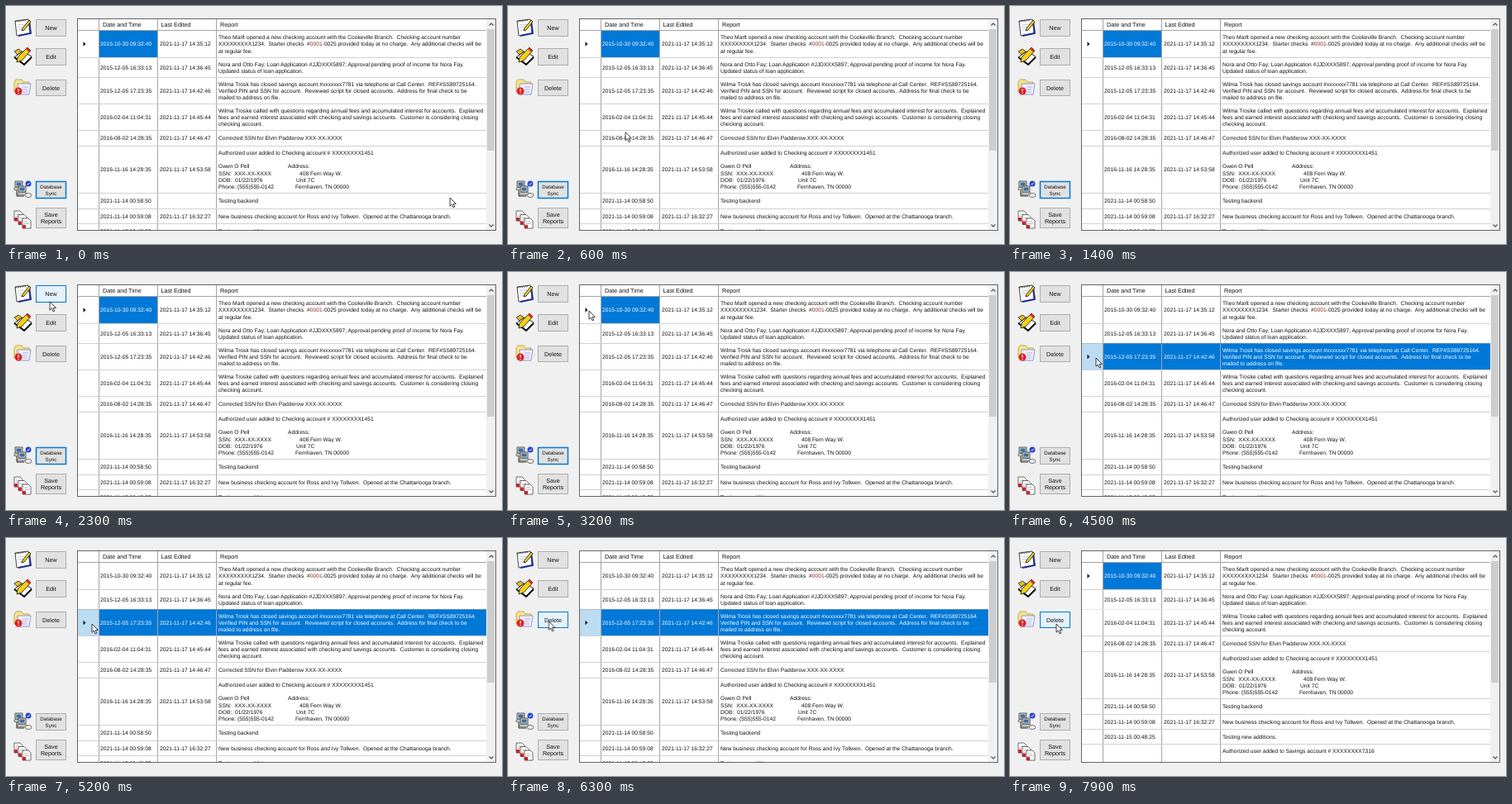
Recreate the animation shown at these times as an HTML page. Size 600 px wide and 288 px high, loop 8 s.

```html
<!DOCTYPE html>
<html lang="en">
<head>
<meta charset="utf-8">
<title>Account reports</title>
<style>
  html, body { margin: 0; width: 100%; height: 100%; overflow: hidden; background: #f0f0f0; }
  svg { display: block; width: 600px; height: 288px; }
  text {
    font: 6.7px "Liberation Sans", Arial, sans-serif;
    fill: var(--fg, #111); white-space: pre; text-rendering: geometricPrecision;
  }
  .head { font-size: 7.2px; }
  .label { font-size: 7.2px; text-anchor: middle; }
  .label.small { font-size: 6.2px; }
  .red { fill: var(--red, #8c2a1c); }
  .bg { fill: var(--bg, #fff); }
  .side { fill: var(--side, #fff); }
  .mark { fill: var(--mark, transparent); }
  .grid { stroke: #a4a4a4; fill: none; shape-rendering: crispEdges; }
  .face { fill: var(--face, #e1e1e1); stroke: var(--edge, #adadad); stroke-width: var(--line, 1px); }

  .first, .rest, .second, .third, .tail, .btn, #cursor { animation: 8s step-end infinite; }
  .first { animation-name: first; }
  .rest { animation-name: rest; }
  .second { animation-name: second; }
  .third { animation-name: third; }
  .tail { animation-name: tail; }
  .new { animation-name: new; }
  .edit { animation-name: edit; }
  .delete { animation-name: delete; }
  .sync { animation-name: sync; }
  #cursor { animation-name: move; animation-timing-function: ease-in-out; }

  @keyframes first {
    0%, 85%, 100% { --bg: #0078d7; --fg: #fff; --mark: #111; }
    55% { --bg: #fff; --fg: #111; --mark: transparent; }
  }
  @keyframes rest {
    0%, 55%, 100% { --bg: #fff; --side: #fff; --fg: #111; --red: #8c2a1c; }
    42.5% { --bg: #0078d7; --side: #bcdcf4; --fg: #fff; --red: #fff; }
  }
  @keyframes second {
    0%, 51%, 100% { --side: #fff; }
    46.5% { --side: #d9ebf9; }
  }
  @keyframes third {
    0%, 85%, 100% { --bg: #fff; --side: #fff; --fg: #111; --mark: transparent; }
    55% { --bg: #0078d7; --side: #bcdcf4; --fg: #fff; --mark: #111; }
  }
  @keyframes tail {
    0% { transform: none; }
    85%, 100% { transform: translateY(-32px); }
  }
  @keyframes new {
    0%, 31.5%, 100% { --face: #e1e1e1; --edge: #adadad; }
    26.1% { --face: #e5f1fb; --edge: #0078d7; }
  }
  @keyframes edit {
    0%, 37.5%, 100% { --face: #e1e1e1; --edge: #adadad; }
    33.3% { --face: #e5f1fb; --edge: #0078d7; }
  }
  @keyframes sync {
    0% { --edge: #0078d7; --line: 1.5px; }
    42.5%, 100% { --edge: #adadad; --line: 1px; }
  }
  @keyframes delete {
    0% { --face: #e1e1e1; --edge: #adadad; }
    73.9%, 82.5%, 100% { --face: #e5f1fb; --edge: #0078d7; }
    81.25% { --face: #cce4f7; --edge: #005499; }
  }
  @keyframes move {
    0%, 1.25% { transform: translate(537px, 232px); }
    11.25% { transform: translate(-20px, 120px); }
    23.75% { transform: translate(-20px, 60px); }
    27.5%, 30% { transform: translate(53px, 36px); }
    35% { transform: translate(58px, 58px); }
    40%, 43.75% { transform: translate(98px, 47px); }
    48.75% { transform: translate(100px, 73px); }
    53.75%, 68.75% { transform: translate(104px, 104px); }
    77.5%, 83.75% { transform: translate(49.5px, 101px); }
    93.75%, 98.74% { transform: translate(63px, 100px); }
    98.75%, 100% { transform: translate(56px, 104px); }
  }
</style>
</head>
<body>
<svg viewBox="0 0 600 288">
  <defs>
    <clipPath id="body"><rect x="87" y="29" width="494" height="242"/></clipPath>
    <g id="sheet">
      <path d="M0 0h7l3 3v9h-10z" fill="#fff" stroke="#444" stroke-width=".8"/>
      <path d="M2 4h5M2 6.500h6" stroke="#999" stroke-width=".7"/>
      <path d="M0 8h4v4h-4z" fill="#c8202c"/>
    </g>
    <g id="pc">
      <path d="M0 0h9v7h-9z" fill="#d8d8d0" stroke="#333" stroke-width=".8"/>
      <path d="M1.500 1.500h6v4h-6z" fill="#3a6ea5"/>
      <path d="M-1 8h11v2.500h-11z" fill="#e8e8e0" stroke="#444" stroke-width=".7"/>
    </g>
  </defs>

  <!-- notepad -->
  <g stroke-width=".9">
    <path d="M11 18l16-2 2 17-16 3z" fill="#fff" stroke="#333"/>
    <path d="M28 17l2 16-15 3" fill="none" stroke="#1a2a9c" stroke-width="1.800"/>
    <path d="M11 19l13-2" stroke="#333" stroke-width="1.600" stroke-dasharray="1 1"/>
    <path d="M14 23l9-1M14 26l8-1M15 29l5-.5" stroke="#bcc4d0"/>
    <path d="M28 17l2 2-8 10-3 1 1-3z" fill="#f2d51c" stroke="#222"/>
  </g>
  <!-- pencil and pad -->
  <g stroke-width=".9">
    <path d="M10 62l10-7 11 6-9 9z" fill="#fff" stroke="#111"/>
    <path d="M10 62l12 9 9-9" fill="none" stroke="#111" stroke-width="2"/>
    <path d="M26 50l4 4-11 12-6 2 1-6z" fill="#f4cf16" stroke="#222"/>
    <path d="M26 50l4 4-2 2-4-4z" fill="#d03030"/>
    <path d="M10 55l5-3 4 3-5 4z" fill="#e6bd1e" stroke="#333"/>
  </g>
  <!-- folder -->
  <g stroke-width=".8">
    <path d="M10 92l2-3h7l2 3h7v12h-18z" fill="#f8e58a" stroke="#b09a3a"/>
    <path d="M14 94h16l-2 13h-14z" fill="#eef0ff" stroke="#7c80c8"/>
    <path d="M20 98h7M20 101h6M20 104h6" stroke="#9aa0d8"/>
    <circle cx="15" cy="103" r="4.500" fill="#e02020"/>
    <path d="M15 100.300v3.200M15 105v1" stroke="#fff" stroke-width="1.300"/>
  </g>
  <!-- linked computers -->
  <g>
    <use href="#pc" x="11" y="212"/>
    <use href="#pc" x="15" y="218"/>
    <path d="M13 223v7h9" fill="none" stroke="#222"/>
    <circle cx="27" cy="215" r="3.500" fill="#2447c8"/>
    <path d="M25.500 215l1.200 1.300 2-2.600" fill="none" stroke="#fff" stroke-width=".9"/>
    <ellipse cx="27" cy="229" rx="4" ry="2.500" fill="#eee" stroke="#444" stroke-width=".7"/>
  </g>
  <!-- report sheets -->
  <use href="#sheet" x="10" y="248"/>
  <use href="#sheet" x="15" y="252.500"/>
  <use href="#sheet" x="20" y="257"/>

  <g id="buttons"></g>
  <path d="M87 16h505v255h-505z" fill="#fff"/>
  <g clip-path="url(#body)" id="rows"></g>
  <g id="header"></g>

  <!-- scroll bar -->
  <path d="M581 16h11v255h-11z" fill="#f0f0f0"/>
  <path d="M582 28h9v147h-9z" fill="#cdcdcd"/>
  <path d="M584.500 23.500l2.500-2.500 2.500 2.500M584.500 264.500l2.500 2.500 2.500-2.500" fill="none" stroke="#505050" stroke-width="1.200"/>
  <path class="grid" d="M86.500 15.500h506v256h-506z" style="stroke:#646464"/>

  <path id="cursor" d="M0 0v10.200l2.400-2.200 1.700 3.900 1.700-.8-1.700-3.700h3.300z" fill="#fff" stroke="#111" stroke-width=".8"/>
</svg>

<script>
  const put = (id, html) => document.getElementById(id).innerHTML = html;
  const text = (x, y, s, cls = "") => `<text x="${x}" y="${y}" class="${cls}">${s}</text>`;
  const box = (x, y, w, h, cls) => `<rect x="${x}" y="${y}" width="${w}" height="${h}" class="${cls}"/>`;

  const buttons = [
    ["new", 16, 21, "New"],
    ["edit", 51, 21, "Edit"],
    ["delete", 89, 20, "Delete"],
    ["sync", 212, 21, "Database", "Sync"],
    ["save", 244, 25, "Save", "Reports"],
  ];
  put("buttons", buttons.map(([name, y, h, ...lines]) => {
    const size = name === "sync" ? "label small" : "label";
    const base = y + h / 2 + 2.6 - (lines.length - 1) * 4;
    return `<g class="btn ${name}">` + box(36.5, y + .5, 36, h - 1, "face") +
      lines.map((s, i) => text(54.5, base + i * 8, s, size)).join("") + "</g>";
  }).join(""));

  // Each row: height, created, edited, report lines; a line may hold [left, x, right].
  const rows = [
    [33, "2015-10-30 09:32:40", "2021-11-17 14:35:12", [
      "Theo Marlt opened a new checking account with the Cookeville Branch.  Checking account number",
      'XXXXXXXXX1234.  Starter checks  #<tspan class="red">0001</tspan>-0025 provided today at no charge.  Any additional checks will be',
      "at regular fee."]],
    [24, "2015-12-05 16:33:13", "2021-11-17 14:36:45", [
      "Nora and Otto Fay; Loan Application #JJDXXX5897; Approval pending proof of income for Nora Fay.",
      "Updated status of loan application."]],
    [32, "2015-12-05 17:23:35", "2021-11-17 14:42:46", [
      "Wilma Trosk has closed savings account #xxxxxxx7781 via telephone at Call Center.  REF#SS89725164.",
      "Verified PIN and SSN for account.  Reviewed script for closed accounts.  Address for final check to be",
      "mailed to address on file."]],
    [32, "2016-02-04 11:04:31", "2021-11-17 14:45:44", [
      "Wilma Troske called with questions regarding annual fees and accumulated interest for accounts.  Explained",
      "fees and earned interest associated with checking and savings accounts.  Customer is considering closing",
      "checking account."]],
    [19, "2016-08-02 14:28:35", "2021-11-17 14:46:47", ["Corrected SSN for Elvin Padderow XXX-XX-XXXX"]],
    [57, "2016-11-16 14:28:35", "2021-11-17 14:53:58", [
      "Authorized user added to Checking account # XXXXXXXX1451",
      "",
      ["Gwen O Pell", 341, "Address:"],
      ["SSN:  XXX-XX-XXXX", 355, "408 Fern Way W."],
      ["DOB:  01/22/1976", 351, "Unit 7C"],
      ["Phone: (555)555-0142", 350, "Fernhaven, TN 00000"]]],
    [19, "2021-11-14 00:58:50", "", ["Testing backend"]],
    [18, "2021-11-14 00:59:08", "2021-11-17 16:32:27", [
      "New business checking account for Ross and Ivy Tollwen.  Opened at the Chattanooga branch."]],
    [18, "2021-11-15 00:48:25", "", ["Testing new additions."]],
    [57, "", "", ["Authorized user added to Savings account # XXXXXXXX7316", "", "", "", "", ""]],
  ];
  const roles = [["", "rest", "first"], ["second", "", ""], ["third", "", ""]];

  let rowY = 29.5;
  const drawn = rows.map(([h, made, edited, lines], n) => {
    const y = rowY, mid = y + h / 2 + 2.4;
    const [whole, rest, cell] = roles[n] || ["", "", ""];
    rowY += h;
    const report = lines.map((line, i) => {
      const ly = mid + (i - (lines.length - 1) / 2) * 8.2;
      const [left, x, right] = [].concat(line);
      return text(257, ly, left) + (right ? text(x, ly, right) : "");
    }).join("");
    const arrow = `<path class="mark" d="M93.500 ${y + h / 2 - 2.7}l3 2.700-3 2.700z"/>`;
    return `<g class="${whole}"><g class="${rest}">` +
      box(87, y, 26, h, "side") + box(183, y, 398, h, "bg") + text(186, mid, edited) + report +
      `</g><g class="${cell}">` + box(113, y, 70, h, "bg") + text(114, mid, made) + arrow + "</g></g>" +
      `<path class="grid" d="M87 ${y + h}H581M112.500 ${y}v${h}M183.500 ${y}v${h}M254.500 ${y}v${h}"/>`;
  });
  put("rows", drawn.slice(0, 3).join("") + `<g class="tail">${drawn.slice(3).join("")}</g>`);

  put("header", text(117, 25.4, "Date and Time", "head") + text(187.5, 25.4, "Last Edited", "head") +
    text(259, 25.4, "Report", "head") +
    '<path class="grid" d="M87 29.500H581M112.500 16v14M183.500 16v14M254.500 16v14"/>');
</script>
</body>
</html>
```
